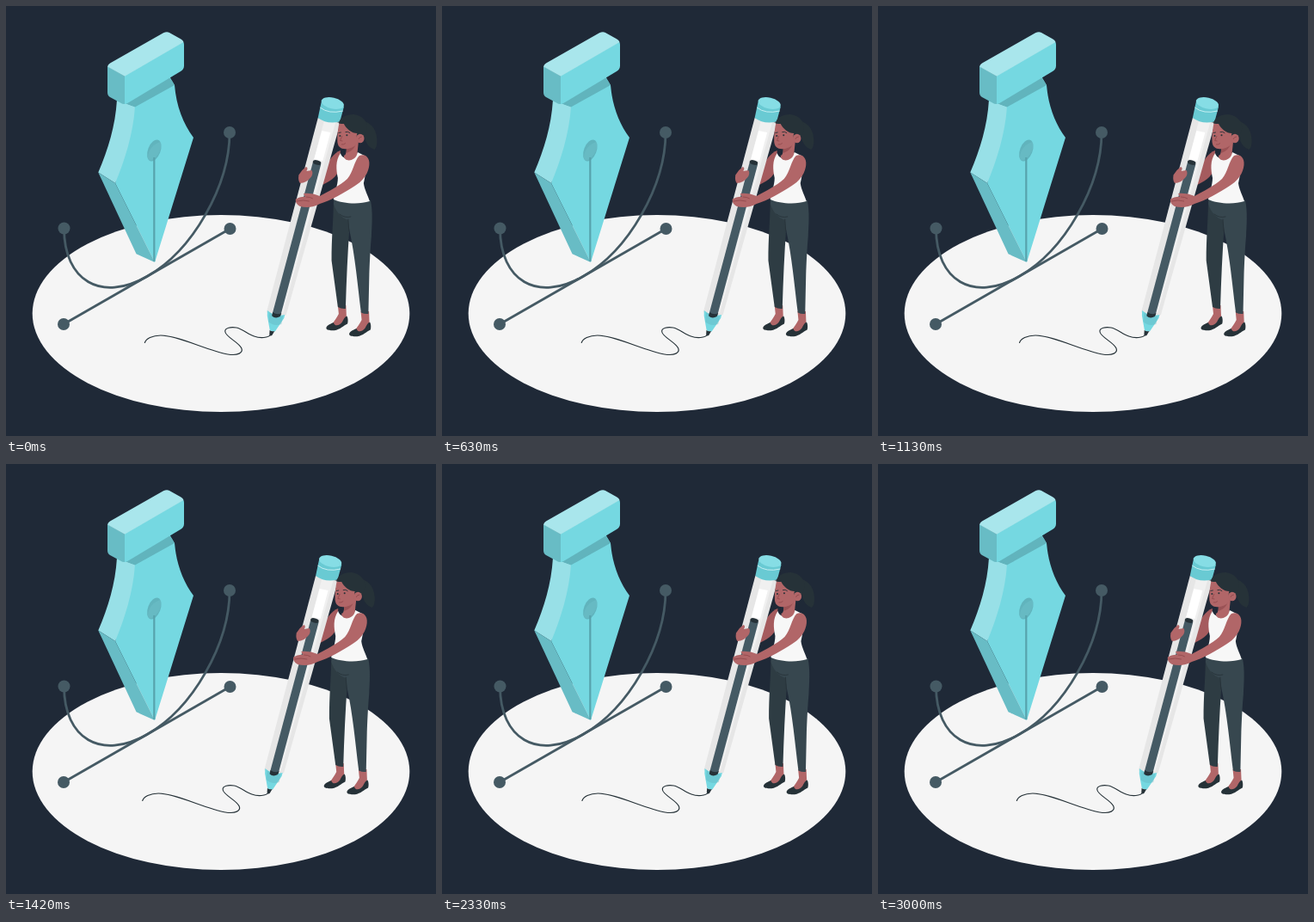
An HTML page that plays this animation: 500x500 px, repeating every 3.04 s.

```html
<!DOCTYPE html>
<html lang="en">
<head>
<meta charset="utf-8">
<title>Drawing with a pen</title>
<style>
  html, body { margin: 0; width: 100%; height: 100%; overflow: hidden; background: #1f2937; }
  svg { display: block; width: 100%; height: 100%; }
  .main { fill: #75d8e1; }
  .light { fill: #a9e6ec; }
  .pale { fill: #98e0e7; }
  .shade { fill: #68bcc5; }
  .dark { fill: #61b4bd; }
  .skin { fill: #b16668; }
  .ink { fill: #263238; }
  .slate { fill: #455a64; }
  .line { fill: none; stroke: #455a64; stroke-width: 2.8; }
  .thin { fill: none; stroke: #263238; stroke-linecap: round; stroke-linejoin: round; }
  .crease { fill: none; stroke: #8f474b; stroke-width: .8; }
</style>
</head>
<body>
<svg viewBox="0 0 500 500">
  <rect width="500" height="500" fill="#1f2937"/>
  <ellipse cx="250" cy="357.5" rx="219.3" ry="114.5" fill="#f5f5f5"/>

  <g id="nib">
    <path class="main" d="M148 113L188 78L193 87L196 92C198 116 206 137 218 153L173 298L127 206Z"/>
    <path class="pale" d="M129 109L150 117C148 148 138 180 127 206L107.3 193.500C119 166 127 140 129 109Z"/>
    <path class="shade" d="M107.3 193.500L127 206L173 298L151.500 288.300Z"/>
    <path class="dark" d="M138 113L184 76L193 87L196 92L150 117.500Z"/>
    <ellipse class="dark" cx="172.300" cy="168" rx="7.300" ry="13" transform="rotate(21 172.300 168)"/>
    <path d="M165 176C165 168 171 160 180 158C182 165 177 175 170 179Q166 181 165 176Z" fill="#70c4cc" opacity=".4"/>
    <path d="M172.300 176V297" stroke="#57a3ac" stroke-width="2.200"/>
    <path class="shade" d="M118 70L138 81.500V114Q135 114 133 112.500L121 106Q118 104 118 100.500Z"/>
    <path class="main" d="M138 81L206 41.500Q207 42.500 207 45V69.500Q207 73.500 203 76L143 112Q140 114 138 114Z"/>
    <path class="light" d="M118 70.500Q118.500 68 121 66.500L183 31.300Q187 29.200 190 31L203 38.300Q206 40 206.500 42L138 81.700Z"/>
  </g>

  <g id="handles">
    <path class="line" d="M67 370L260.500 259"/>
    <path class="line" d="M67.500 258.500C67.500 319.500 110.500 345 164 314.500S260 208.500 260 147"/>
    <g class="slate">
      <circle cx="260" cy="147" r="7"/>
      <circle cx="67.500" cy="258.500" r="7"/>
      <circle cx="260.500" cy="259" r="7"/>
      <circle cx="67" cy="370" r="7"/>
    </g>
  </g>

  <g id="artist">
    <path class="thin" stroke-width="1.150" d="M161.500 391.500C163 387 170 383 180 383C200 383 235 401 258 405C270 407 276 403 274 398C271 391 256 385 255 379C254 374 262 373 268 374C278 376 286 387 300 385.500Q306 385 308 382"/>

    <path class="skin" style="fill:#a55b5e" d="M389 168C381 171 376 179 370 190L365 209C376 205 385 199 388 189Z"/>

    <g id="feet">
      <g id="foot">
        <path class="skin" d="M386 348H395.500L396 361Q391 370 385 373L378 371.500Q384 364 387 358Z"/>
        <path class="ink" d="M372.500 374C374 370.500 378 369.500 381 368C382 373 388 372 391 367.500C393 364 394 361.500 396.500 360.500C398 363 398 367 397.200 369.500C392 372 389 376 382 377.200C377 377.500 372 377 372.500 374Z"/>
      </g>
      <use href="#foot" x="26.700" y="7"/>
    </g>

    <path fill="#2e3c43" d="M381 224L402 228L399.500 258Q396.500 300 395 352Q390 352.500 386 350L378.700 296C378.500 270 381 248 381 224Z"/>
    <path fill="#37474f" d="M382 224L424 226C427 240 425.500 255 425 268C423.500 285 423 300 422.500 312L421.500 358Q417 358.500 413 356.500C409 325 406 290 399.500 261L398 249C390 246 384 240 381 230Z"/>
    <path class="thin" stroke-width=".8" d="M388 242Q394 247 401 245M398 248L399 262"/>

    <path fill="#f7f7f7" d="M389 171C391 179 404 181 409 170L417 174C420 185 418 198 416 206C417 214 421 220 423 227C411 231 392 230 381 225C382 217 386 209 386 200C384 190 383 180 389 171Z"/>

    <g id="pen" transform="translate(-.6 0)">
      <path fill="#e6e6e6" d="M363.500 130L389.500 136L326.500 359Q317 365 303.700 356Z"/>
      <path fill="#f0f0f0" d="M371 132L384 135L323 357L312 357Z"/>
      <path fill="#fff" d="M368 145L378 147L369 180L359 178Z"/>
      <path class="main" d="M304.700 354Q314 362 325 359L324 363L313.500 378.500Q310 379 307.500 377L304.500 360Z"/>
      <path class="dark" d="M307 356Q314 362 323 360L321 370Q312 373 306 367Z" opacity=".4"/>
      <path class="slate" d="M357.500 182L367 184L320 360Q315 363 310 359.500Z"/>
      <path class="ink" d="M311 356Q316 360 321 357L319.500 361Q314 364 310 360.500Z"/>
      <ellipse class="ink" cx="362.300" cy="182" rx="4.900" ry="2.700" transform="rotate(14 362.300 182)"/>
      <path class="ink" d="M307.300 377Q310 379 313 378L310 383Q308.500 384 307 382.500Z"/>
      <path fill="#69cad3" d="M367.300 112L363.500 130Q374 138 389 134.500L393.700 117Z"/>
      <path d="M366 118Q376 126 392.500 122" fill="none" stroke="#c5eff3" stroke-width="1"/>
      <ellipse cx="380.500" cy="113" rx="13.400" ry="6.500" transform="rotate(13 380.500 113)" fill="#86dde5"/>
    </g>

    <path class="skin" d="M396 160L410 158L408.500 172C406 181 393 182 393 174Q396 173 396 166Z"/>
    <path fill="#9a5255" d="M396 166Q403 165 407 160Q405 168 396 171Z"/>

    <g id="head">
      <path class="ink" d="M412 133C423 134 431 142 431.500 155Q432 164 428.500 167C423 165 418 160 417 151Z"/>
      <path class="skin" d="M388 134C386 143 385 151 385.500 158C386 164 390 167 397 166C404 165 409 161 411 155L410 136Z"/>
      <path class="ink" d="M387 136.500C388 130 396 126 404 126C415 127 421 135 420 143C419 149 417 153 414 154L409 157Q407 151 408.500 148C402 148 396 143 393 137Q390 137 387 136.500Z"/>
      <ellipse class="skin" cx="412" cy="154" rx="4.700" ry="5.200"/>
      <path class="crease" d="M410 155Q411 152 414 152"/>
      <circle class="ink" cx="388.500" cy="151" r="1"/>
      <circle class="ink" cx="396.500" cy="150.300" r="1"/>
      <path class="thin" stroke-width=".9" d="M387 147.500L389.500 147M395 146.500Q398 145.500 400 147.500"/>
      <path class="crease" d="M391 151L388.700 156.500L391.500 157M390 161Q393 161.500 395 159.500"/>
    </g>

    <path class="skin" d="M349 187Q352 188 349.500 192L355.500 191Q357.500 194 355.500 198C352 203 347 206 342 206Q339.500 203 340.500 196.500Q344 190.500 349 187Z"/>
    <path class="skin" d="M411 174C419 171 424.500 178 422 188C420 197 414 204 406 209C394 217 378 226 365 230C358 234 350 235 342 233Q336 230 337 224.500Q343 221 348 222L346 218Q356 217 365 221C376 215 388 209 397 201C404 193 405 180 411 174Z"/>
    <path class="crease" d="M338 227Q346 225 353 227M349 222Q354 222 357 224"/>
  </g>
</svg>
<script>
  const LOOP = 3040, SHAKE = 3000, LEAD = 38, FPS = 24;
  // Horizontal offset at every tenth of the shake
  const stops = [0, -1, 2, -4, 4, -4, 4, -4, 2, -1, 0];
  const artist = document.getElementById('artist');

  function offsetAt(ms) {
    const pos = (ms % SHAKE) / SHAKE * (stops.length - 1);
    const i = Math.floor(pos);
    return stops[i] + (stops[i + 1] - stops[i]) * (pos - i);
  }

  function render(ms) {
    const step = Math.min(72, Math.floor(((ms % LOOP) + 5) * FPS / 1000));
    const x = offsetAt(step * 1000 / FPS + LEAD);
    artist.setAttribute('transform', `translate(${x.toFixed(3)} 0)`);
  }

  const start = performance.now();
  function tick() {
    render(performance.now() - start);
    requestAnimationFrame(tick);
  }
  tick();
</script>
</body>
</html>
```
